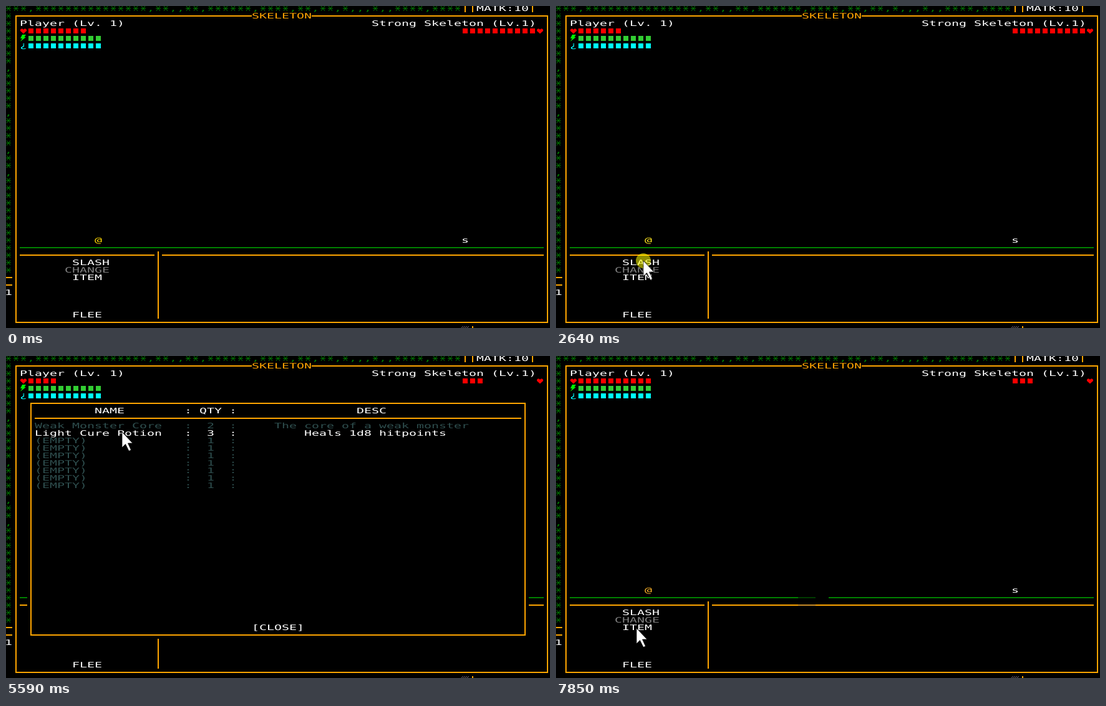
An HTML page that plays this animation: 872 px wide and 517 px high, repeating every 8000 ms.

```html
<!DOCTYPE html>
<html lang="en">
<head>
<meta charset="utf-8">
<title>Skeleton battle</title>
<style>
html, body { margin: 0; width: 100%; height: 100%; overflow: hidden; background: #000; }
svg { display: block; width: 872px; height: 517px; }
text {
  font: 12px "DejaVu Sans Mono", "Liberation Mono", monospace;
  text-rendering: geometricPrecision; white-space: pre; fill: #fff;
}
.gold { fill: orange; }
.grey { fill: #808080; }
.dim { fill: #2f4f4f; }
.cyan { fill: #0ff; }
.tree { fill: #008000; }
.red { fill: #f00; }
.green { fill: #32cd32; }

/* timeline: 1% = 80ms */
.step { animation: 8s step-end infinite; }
#hero text { animation: tint 8s step-end infinite; }
#hp4 { animation-name: hp4; }
#hp6 { animation-name: hp6; }
#hp8 { animation-name: hp8; }
#foe { animation-name: foe; }
#missed { animation-name: missed; }
#hits { animation-name: hits; }
#bag { animation-name: bag; }
#healed { animation-name: healed; }
#wear { animation-name: hp8; }
#click { animation-name: click; }
#pointer { animation: show 8s step-end infinite, move 8s linear infinite; }

@keyframes tint { 0% { fill: #ffd700 } 13.5% { fill: #ffe620 } 33.75% { fill: #ffd21e } 73.25%, 100% { fill: #ffb428 } }
@keyframes hp4 { 0% { opacity: 1 } 33.75% { opacity: 0 } 73.25%, 100% { opacity: 1 } }
@keyframes hp6 { 0% { opacity: 1 } 13.5% { opacity: 0 } 73.25%, 100% { opacity: 1 } }
@keyframes hp8 { 0% { opacity: 0 } 73.25%, 100% { opacity: 1 } }
@keyframes foe { 0% { opacity: 1 } 33.75%, 100% { opacity: 0 } }
@keyframes missed { 0% { opacity: 0 } 13.5% { opacity: 1 } 22.875%, 100% { opacity: 0 } }
@keyframes hits { 0% { opacity: 0 } 33.75% { opacity: 1 } 42.375%, 100% { opacity: 0 } }
@keyframes bag { 0% { opacity: 0 } 51.25% { opacity: 1 } 73.25%, 100% { opacity: 0 } }
@keyframes healed { 0% { opacity: 0 } 73.25% { opacity: 1 } 91.375%, 100% { opacity: 0 } }
@keyframes show { 0% { opacity: 0 } 1.75%, 100% { opacity: 1 } }
@keyframes click {
  0%, 13.5%, 22.875%, 33.75%, 42.375%, 51.25%, 73.25%, 91.375%, 100% { opacity: 0 }
  11.625%, 21.125%, 32.125%, 40.75%, 49.5%, 71.5%, 89.75% { opacity: .56 }
}
@keyframes move {
  0%, 1.75% { transform: translate(541px, 468px) }
  3.5% { transform: translate(390px, 458px) }
  5.25% { transform: translate(215px, 426px) }
  6.625%, 9.125% { transform: translate(143px, 412px) }
  9.875%, 17.2% { transform: translate(142px, 408px) }
  19.375% { transform: translate(470px, 445px) }
  20.5%, 22.875% { transform: translate(528px, 446px) }
  24.5% { transform: translate(330px, 438px) }
  26.375%, 30.5% { transform: translate(142px, 411px) }
  32.125%, 37.5% { transform: translate(140px, 409px) }
  39% { transform: translate(350px, 440px) }
  40.5%, 42.375% { transform: translate(530px, 458px) }
  43.5% { transform: translate(375px, 461px) }
  44.375% { transform: translate(227px, 458px) }
  46% { transform: translate(145px, 440px) }
  47.875%, 52.25% { transform: translate(130px, 437px) }
  55% { transform: translate(150px, 300px) }
  59%, 59.875% { transform: translate(167px, 134px) }
  66.625%, 69% { transform: translate(188px, 132px) }
  69.875%, 76% { transform: translate(186px, 122px) }
  80% { transform: translate(300px, 305px) }
  84.5% { transform: translate(406px, 454px) }
  86.25% { transform: translate(431px, 453px) }
  88.5%, 91.375% { transform: translate(529px, 452px) }
  93.5% { transform: translate(350px, 440px) }
  96.375% { transform: translate(153px, 412px) }
  98.125%, 100% { transform: translate(129px, 437px) }
}
</style>
</head>
<body>
<svg viewBox="0 0 872 517">
  <defs>
    <path id="star" d="M-4 0H4M-3-4 3 4M3-4-3 4" fill="none" stroke="#008000"/>
    <path id="heart" d="M0 4.5-5 0V-2L-3.5-3.5H-1.5L0-2 1.5-3.5H3.5L5-2V0Z" fill="#f00"/>
  </defs>

  <g id="world"></g>
  <g stroke="orange" stroke-width="2">
    <path d="M736 0V10M748 0V10M844 0V10M0 436H10M0 448H10M748 514V517"/>
    <path d="M730 517 733 514M733 517 736 514M736 517 739 514M739 517 742 514" stroke="#776f80" stroke-width="1"/>
  </g>

  <path d="M10 10H872V514H10Z"/>
  <g fill="none" stroke="orange" stroke-width="2">
    <path d="M394 16H16V508H868V16H490"/>
    <path d="M22 388H862" stroke="#008000"/>
    <path d="M22 400H238M250 400H862M244 394V502"/>
  </g>
  <g id="wear" class="step">
    <path d="M388 386H437V390H388Z"/>
    <path d="M388 387H416V389H388Z" fill="#003c00"/>
    <path d="M388 399H416V401H388Z" fill="#c88c28"/>
  </g>

  <use href="#heart" x="28" y="40"/>
  <use href="#heart" x="856" y="40"/>
  <path d="M26 46H32L29.5 50H32L23 57 26 52H23Z" fill="#00f000"/>
  <g id="bars"></g>
  <g id="hp4" class="step"></g>
  <g id="hp6" class="step"></g>
  <g id="hp8" class="step"></g>
  <g id="foe" class="step"></g>

  <g id="labels"></g>
  <g id="hero"></g>
  <g id="missed" class="step"></g>
  <g id="hits" class="step"></g>
  <g id="healed" class="step"></g>

  <g id="bag" class="step">
    <path d="M34 70H838V454H34Z"/>
    <path d="M40 76H832V448H40ZM46 100H826" fill="none" stroke="orange" stroke-width="2"/>
  </g>

  <g id="pointer">
    <circle id="click" class="step" r="12" fill="#ff0"/>
    <path d="M0 0V25L5.5 19.5 11 30.5 14.5 29 9.5 18H17Z" fill="#fff" stroke="#000" stroke-width=".7"/>
  </g>
</svg>
<script>
const NS = 'http://www.w3.org/2000/svg';
const CELL = 12;
const WIDE = 12 / 7.224; // square-cell face: one advance fills a cell

function add(id, tag, attrs) {
  const el = document.createElementNS(NS, tag);
  for (const k in attrs) el.setAttribute(k, attrs[k]);
  document.getElementById(id).append(el);
  return el;
}

// x is the left edge of the first cell, y the middle of the row
function write(id, str, x, y, cls = '') {
  add(id, 'text', {
    class: cls, transform: `translate(${x} ${y + 4.4}) scale(${WIDE} 1)`
  }).textContent = str;
}

function blocks(id, cls, x, y, from, to) {
  for (let i = from; i < to; i++)
    add(id, 'rect', { class: cls, x: x + i * CELL + 2, y: y - 4, width: 8, height: 8 });
}

function tile(ch, x, y) {
  if (ch === '*') add('world', 'use', { href: '#star', x, y });
  else write('world', ch, x - 6, y, 'tree');
}

const commas = [3, 19, 22, 23, 26, 33, 38, 41, 44, 46, 47, 48, 50, 51, 56];
for (let i = 0; i < 61; i++) tile(commas.includes(i) ? ',' : '*', 4 + i * CELL, 4);
for (let i = 1; i < 36; i++) tile([8, 14, 19, 22].includes(i) ? ',' : '*', 4, 4 + i * CELL);
write('world', 'MATK:10', 754, 4);
write('world', '1', -2, 460);

blocks('bars', 'red', 34, 40, 0, 4);
blocks('hp4', 'red', 34, 40, 4, 6);
blocks('hp6', 'red', 34, 40, 6, 8);
blocks('hp8', 'red', 34, 40, 8, 10);
blocks('bars', 'green', 34, 52, 0, 10);
blocks('bars', 'cyan', 34, 64, 0, 10);
blocks('bars', 'red', 730, 40, 0, 3);
blocks('foe', 'red', 730, 40, 3, 10);

write('labels', 'SKELETON', 394, 16, 'gold');
write('labels', 'Player (Lv. 1)', 22, 28);
write('labels', 'Strong Skeleton (Lv.1)', 586, 28);
write('labels', '¿', 22, 63, 'cyan');
write('labels', 's', 730, 376);
write('labels', 'SLASH', 106, 412);
write('labels', 'CHANGE', 94, 424, 'grey');
write('labels', 'ITEM', 106, 436);
write('labels', 'FLEE', 106, 496);
write('hero', '@', 142, 376);

write('missed', 'Player used Slash but missed!', 250, 412);
write('missed', 'Skeleton used Slash.', 250, 424);
write('hits', 'Player used Slash.', 250, 412);
write('hits', 'Skeleton used Slash.', 250, 424);
write('healed', 'Used the Light Cure Potion.', 394, 424);
write('healed', 'Healed 6 hit points!', 430, 436);
for (const id of ['missed', 'hits', 'healed']) write(id, '[OKAY]', 514, 460);

function row(y, cls, name, nameX, qty, qtyX, desc, descX) {
  write('bag', name, nameX, y, cls);
  write('bag', ':', 286, y, cls);
  write('bag', qty, qtyX, y, cls);
  write('bag', ':', 358, y, cls);
  if (desc) write('bag', desc, descX, y, cls);
}
row(88, '', 'NAME', 142, 'QTY', 310, 'DESC', 562);
row(112, 'dim', 'Weak Monster Core', 46, '2', 322, 'The core of a weak monster', 430);
row(124, '', 'Light Cure Potion', 46, '3', 322, 'Heals 1d8 hitpoints', 478);
for (let i = 0; i < 7; i++) row(136 + i * CELL, 'dim', '(EMPTY)', 46, '1', 322);
write('bag', '[CLOSE]', 394, 436);
</script>
</body>
</html>
```
